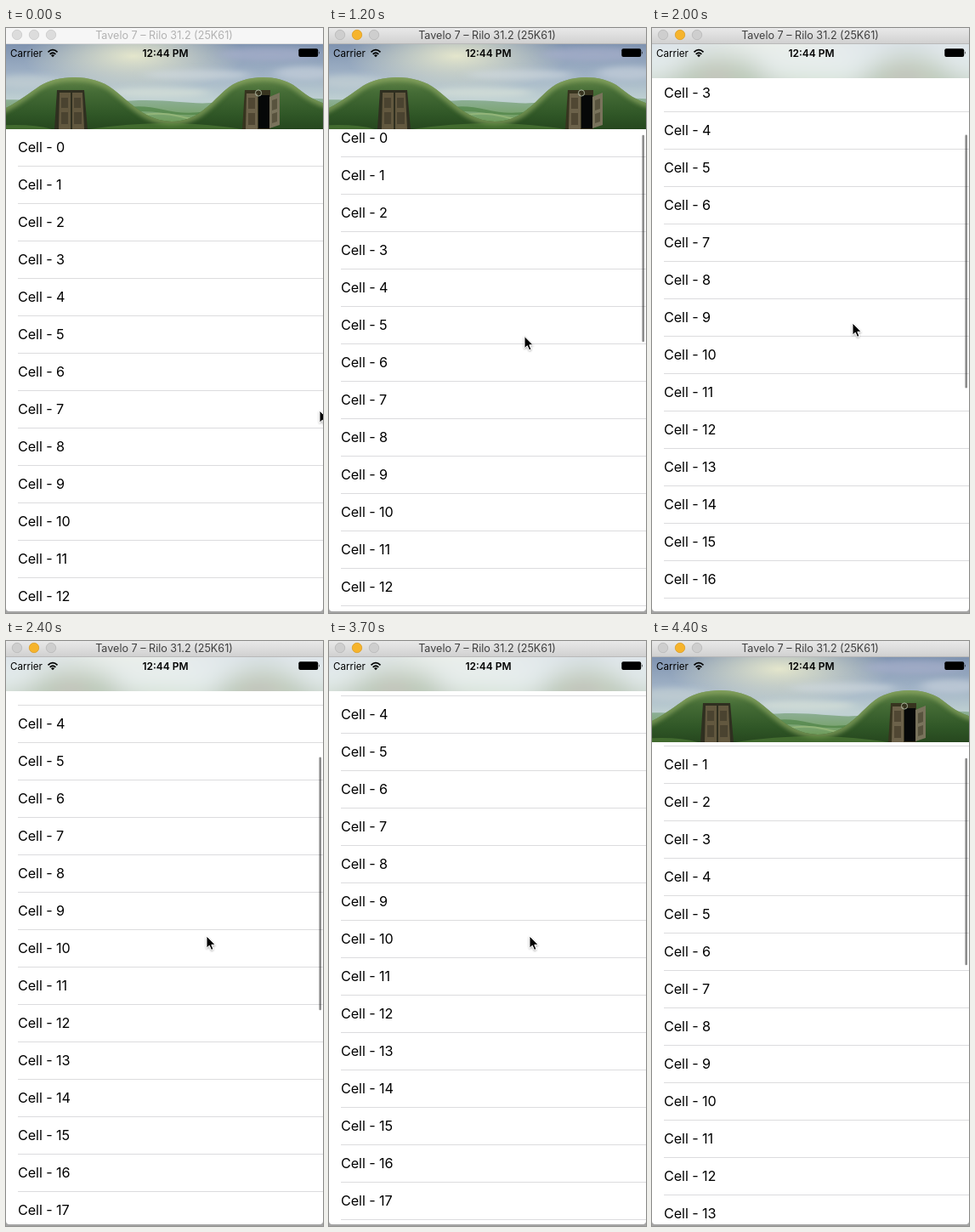
These frames come from a looping animation (373 by 688 pixels, 4.5 s). An HTML page:

```html
<!DOCTYPE html>
<html lang="en">
<head>
<meta charset="utf-8">
<title>Collapsing header</title>
<style>
html, body { margin: 0; width: 100%; height: 100%; overflow: hidden; background: #fff; }
svg { display: block; }
text { font-family: Inter, "Liberation Sans", sans-serif; }
.cell { font-size: 16.2px; letter-spacing: -.1px; fill: #000; }
</style>
</head>
<body>
<svg width="373" height="688" viewBox="0 0 373 688">
  <defs>
    <linearGradient id="sky" x2="0" y2="1">
      <stop offset="0" stop-color="#7f93b0"/>
      <stop offset=".35" stop-color="#9fb1c5"/>
      <stop offset=".65" stop-color="#bfd0d2"/>
    </linearGradient>
    <radialGradient id="glow">
      <stop offset="0" stop-color="#e4e6cc"/>
      <stop offset="1" stop-color="#e4e6cc" stop-opacity="0"/>
    </radialGradient>
    <linearGradient id="field" x2="0" y2="1">
      <stop offset="0" stop-color="#8fb09a"/>
      <stop offset=".5" stop-color="#69994f"/>
      <stop offset="1" stop-color="#4d7d36"/>
    </linearGradient>
    <linearGradient id="grass" gradientUnits="userSpaceOnUse" x1="0" y1="36" x2="0" y2="104">
      <stop offset="0" stop-color="#688a4c"/>
      <stop offset=".3" stop-color="#456c36"/>
      <stop offset=".7" stop-color="#2f5626"/>
      <stop offset="1" stop-color="#24431c"/>
    </linearGradient>
    <linearGradient id="barOn" x2="0" y2="1">
      <stop offset="0" stop-color="#e9e9e9"/>
      <stop offset="1" stop-color="#d0d0d0"/>
    </linearGradient>
    <filter id="soft" filterUnits="userSpaceOnUse" x="-60" y="-40" width="500" height="200">
      <feGaussianBlur stdDeviation="7 3"/>
    </filter>
    <filter id="rimBlur" filterUnits="userSpaceOnUse" x="-60" y="-40" width="500" height="200">
      <feGaussianBlur stdDeviation="2.5"/>
    </filter>
    <filter id="frost" filterUnits="userSpaceOnUse" x="-60" y="-40" width="500" height="200">
      <feGaussianBlur stdDeviation="12"/>
    </filter>
    <filter id="drop" x="-50%" y="-50%" width="200%" height="200%">
      <feDropShadow dx="0" dy="1" stdDeviation="1" flood-opacity=".35"/>
    </filter>
    <path id="mounds" d="M-50 92C0 82 20 62 40 49C62 35 104 35 126 53C150 72 165 90 195 91C225 91 240 70 258 54C278 35 318 35 338 48C355 60 362 72 423 80V130H-50Z"/>
    <clipPath id="moundClip"><use href="#mounds"/></clipPath>
    <clipPath id="headClip"><rect id="headBox" y="19" width="373" height="100"/></clipPath>
    <clipPath id="window"><path d="M0 0H373V682Q373 686 369 686H4Q0 686 0 682Z"/></clipPath>

    <g id="picture">
      <rect x="-50" y="-30" width="473" height="160" fill="#7f93b0"/>
      <rect x="-50" width="473" height="100" fill="url(#sky)"/>
      <ellipse cx="150" cy="14" rx="130" ry="44" fill="url(#glow)"/>
      <g filter="url(#soft)">
        <ellipse cx="26" cy="44" rx="40" ry="8" fill="#c6d2d6" opacity=".6"/>
        <ellipse cx="225" cy="36" rx="62" ry="6" fill="#d3dbdf" opacity=".6"/>
        <ellipse cx="310" cy="12" rx="60" ry="8" fill="#a5aecb" opacity=".7"/>
        <ellipse cx="352" cy="34" rx="36" ry="8" fill="#c5cfdb" opacity=".7"/>
        <ellipse cx="180" cy="57" rx="60" ry="6" fill="#d7e2d9" opacity=".7"/>
      </g>
      <path d="M-50 70C0 62 20 66 60 68C110 70 135 66 165 66C200 66 225 72 250 68C300 62 350 62 423 67V130H-50Z" fill="url(#field)"/>
      <path d="M120 80Q150 68 185 77T262 73V80Q220 86 185 81T120 84Z" fill="#477d3d" opacity=".6"/>
      <path d="M140 88Q175 77 205 85T250 82" fill="none" stroke="#a3c280" stroke-width="2" opacity=".6"/>
      <use href="#mounds" fill="url(#grass)"/>
      <g clip-path="url(#moundClip)">
        <use href="#mounds" fill="none" stroke="#93ad66" stroke-width="9" opacity=".65" filter="url(#rimBlur)"/>
        <path d="M-50 100Q20 90 54 100ZM98 100Q190 86 278 100Z" fill="#5d8c3f" opacity=".5"/>
      </g>
      <path d="M57 100L60 54H92L96 100Z" fill="#2f2f20"/>
      <path d="M62 100L63 57H76V100ZM78 100V57H90L92 100Z" fill="#62583f"/>
      <path d="M65 63h8v12h-8zM80 63h8v12h-8zM65 80h8v14h-8zM80 80h9v14h-9z" fill="#4a4330"/>
      <path d="M278 100L281 54H311V100Z" fill="#37341f"/>
      <path d="M282 100L283 58H296V100Z" fill="#6c624a"/>
      <path d="M285 63h8v13h-8zM285 81h8v14h-8z" fill="#504733"/>
      <path d="M297 60H310V99H297Z" fill="#060808"/>
      <path d="M310 62L322 57V95L310 99Z" fill="#79735c"/>
      <path d="M313 66l6-2v12l-6 2zM313 82l6-2v11l-6 2z" fill="#58533e"/>
      <circle cx="297" cy="57.5" r="3.6" fill="none" stroke="#a8b29b"/>
    </g>
  </defs>

  <rect width="373" height="688" fill="#a5a5a5"/>
  <g clip-path="url(#window)">
    <rect width="373" height="688" fill="#fff"/>
    <g id="list"></g>
    <rect id="thumb" x="368.4" width="2.6" rx="1.3"/>
    <g clip-path="url(#headClip)">
      <g id="art">
        <use href="#picture"/>
        <g id="veil">
          <use href="#picture" filter="url(#frost)"/>
          <rect x="-10" y="-30" width="393" height="160" fill="#fafcfb" opacity=".68"/>
        </g>
      </g>
    </g>
    <text x="5" y="33.5" font-size="11.6">Carrier</text>
    <g fill="none" stroke="#000" stroke-width="1.8">
      <path d="M49.5 28.3Q55 23 60.5 28.3M51.7 30.8Q55 27.6 58.3 30.8"/>
      <path d="M53 32.2Q55 30.4 57 32.2L55 34.3Z" fill="#000" stroke="none"/>
    </g>
    <text x="187.5" y="33.5" font-size="12" font-weight="600" text-anchor="middle">12:44 PM</text>
    <rect x="344.3" y="24.3" width="22.9" height="9.6" rx="2"/>
    <path d="M368 27.3Q369.5 29 368 30.9Z"/>
    <rect id="bar" width="373" height="18.5"/>
    <rect id="rim" y="18" width="373" height="1"/>
    <g id="lights"></g>
    <text id="caption" x="186" y="13" font-size="12.6" text-anchor="middle">Tavelo 7 – Rilo 31.2 (25K61)</text>
  </g>
  <path id="pointer" d="M0 0V14.2L3.3 11.2L5.6 16.4L8 15.4L5.8 10.3H10.2Z" stroke="#fff" filter="url(#drop)"/>
</svg>
<script>
const LOOP = 4500, STEP = 100, ROW = 44, ROWS = 30;
const TOP = 19, FLOOR = 686, TALL = 119, SHORT = 59;
const $ = id => document.getElementById(id);
const set = (el, attrs) => { for (const k in attrs) el.setAttribute(k, attrs[k]); return el; };
const add = (parent, tag, attrs) =>
  parent.appendChild(set(document.createElementNS("http://www.w3.org/2000/svg", tag), attrs));

// Smooth 0 to 1 between two times
function ease(t, from, to) {
  const u = Math.min(1, Math.max(0, (t - from) / (to - from)));
  return u * u * (3 - 2 * u);
}

// A flick that picks up quickly and decays, then a pull back
function scrollAt(t) {
  const flick = 1 - Math.exp(-Math.pow(Math.max(0, t - 1117) / 631, 1.34));
  return Math.round(Math.min(170, 172 * flick) - 137 * ease(t, 3700, 4500));
}

const foldAt = t => ease(t, 1390, 1980) - ease(t, 3800, 4200);
const thumbAt = t => ease(t, 1000, 1100) - ease(t, 3100, 3500) + ease(t, 3700, 3800);

for (let i = 0; i < ROWS; i++) {
  const y = i * ROW;
  add($("list"), "text", { x: 14, y: y + 27, class: "cell" }).textContent = "Cell - " + i;
  add($("list"), "rect", { x: 14, y: y + 43, width: 359, height: 1, fill: "#dcdcde" });
}
const lights = [13, 33, 53].map(cx => add($("lights"), "circle", { cx, cy: 8, r: 5.7, "stroke-width": .8 }));

function draw(t) {
  const fold = foldAt(t), scroll = scrollAt(t);
  const head = Math.round(TALL - (TALL - SHORT) * fold);
  const view = FLOOR - head, ratio = view / (ROW * ROWS);

  set($("list"), { transform: `translate(0 ${head - scroll})` });
  set($("headBox"), { height: head - TOP });
  set($("art"), { transform: `translate(0 ${TOP - (TALL - head) / 2})` });
  set($("veil"), { opacity: fold });
  set($("thumb"), { y: head + 2 + scroll * ratio, height: view * ratio, opacity: .45 * thumbAt(t) });

  const active = t >= 900;
  set($("bar"), { fill: active ? "url(#barOn)" : "#f6f6f6" });
  set($("rim"), { fill: active ? "#b9b9b9" : "#dedede" });
  set($("caption"), { fill: active ? "#3f3f3f" : "#b2b2b2" });
  lights.forEach((c, i) => set(c, active && i === 1
    ? { fill: "#f6b42c", stroke: "#dc9d24" }
    : { fill: active ? "#cecece" : "#dcdcdc", stroke: active ? "#b8b8b8" : "#cacaca" }));

  const enter = ease(t, 0, 1000), nudge = ease(t, 1200, 1500);
  set($("pointer"), {
    transform: `translate(${369 - 139 * enter + 6 * nudge} ${450 - 87.5 * enter - 15.5 * nudge})`,
    visibility: t < 4100 ? "visible" : "hidden"
  });
}

const start = performance.now();
function tick() {
  const t = (performance.now() - start) % LOOP;
  draw(Math.floor(t / STEP) * STEP);
  requestAnimationFrame(tick);
}
tick();
</script>
</body>
</html>
```
